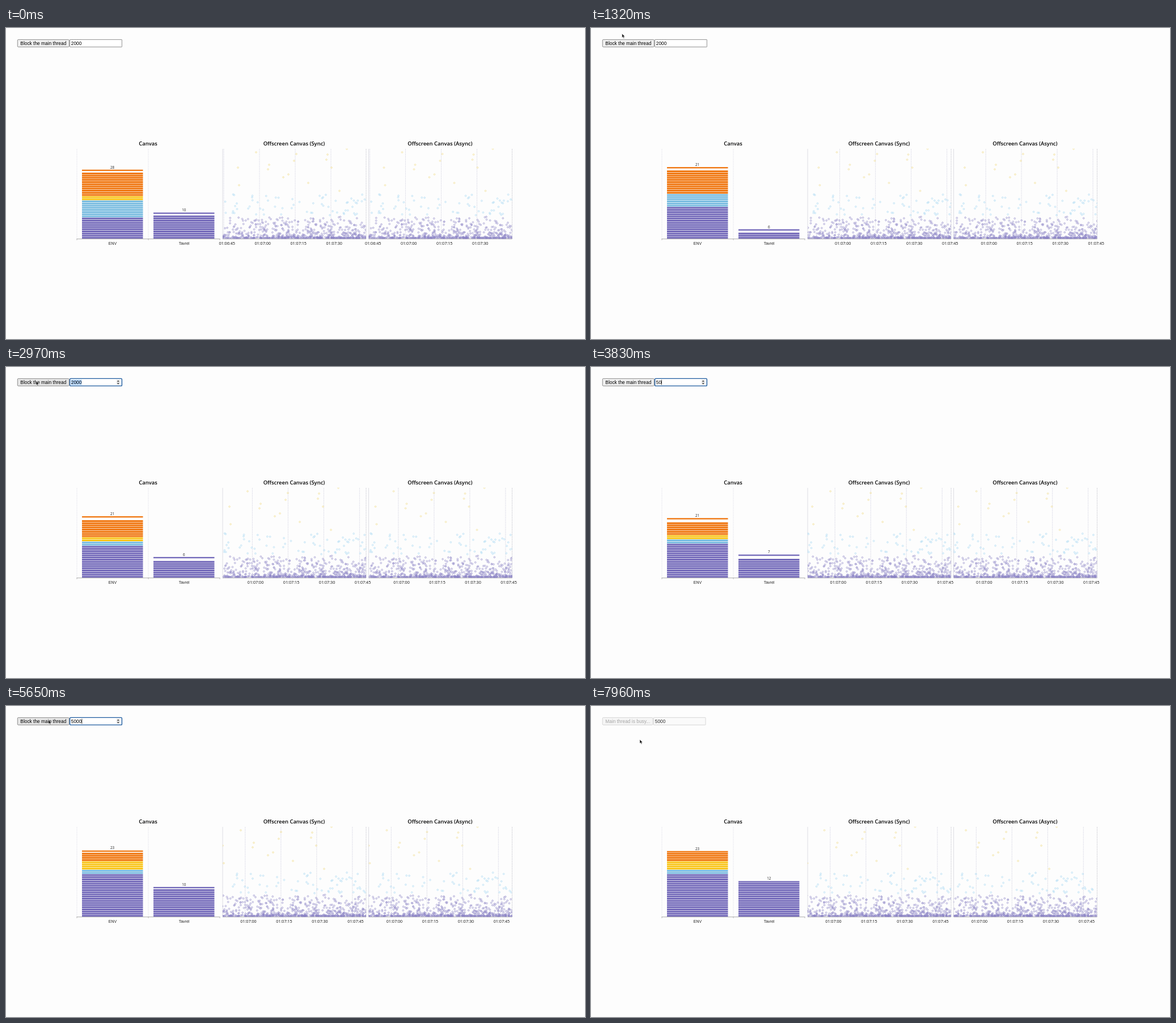
An HTML page with a canvas for the animation above (8000 ms loop, 1021x548 px).

```html
<!DOCTYPE html>
<html lang="en">
<head>
<meta charset="utf-8">
<title>Canvas chart comparison</title>
<style>
  html, body { margin: 0; width: 100%; height: 100%; overflow: hidden; background: #fdfdfd; }
  canvas, svg { position: absolute; left: 0; top: 0; width: 1021px; height: 548px; }
  text { white-space: pre; }
  .ui { font: 8.4px "Liberation Sans", Arial, sans-serif; }
  .title { font: 600 9.45px "Open Sans", "Noto Sans", sans-serif; text-anchor: middle; }
  .name { font: 7px "Liberation Sans", Arial, sans-serif; text-anchor: middle; fill: #222; }
  .count { font: 6.2px "Open Sans", "Noto Sans", sans-serif; text-anchor: middle; fill: #222; }
  .tick { font: 500 7.2px "Open Sans", "Noto Sans", sans-serif; fill: #111; }
</style>
</head>
<body>
<canvas id="stage"></canvas>
<svg viewBox="0 0 1021 548">
  <g class="ui">
    <rect id="button" x="20.3" y="20.4" height="13" rx="1.6" stroke-width=".8"/>
    <text id="caption" x="25.3" y="30"></text>
    <rect id="field" y="20.4" height="13" width="91.8"/>
    <rect id="marked" x="114.6" y="22.3" width="19" height="9.4" fill="#b3d7fe"/>
    <text id="value" y="30"></text>
    <rect id="caret" y="22.6" width=".8" height="8.8"/>
    <g id="spinner">
      <rect x="194.3" y="22" width="7.2" height="9.8" fill="#efefef"/>
      <path d="M195.7 26l2.1-2.8 2.1 2.8zM195.7 28l2.1 2.8 2.1-2.8z" fill="#505050"/>
    </g>
  </g>
  <g class="title">
    <text x="250.6" y="207.2">Canvas</text>
    <text x="508" y="207.2">Offscreen Canvas (Sync)</text>
    <text x="765.4" y="207.2">Offscreen Canvas (Async)</text>
  </g>
  <text class="name" x="188" y="382">ENV</text>
  <text class="name" x="314" y="382">Tavrel</text>
  <text class="count" id="countA" x="187.6"></text>
  <text class="count" id="countB" x="313.7"></text>
  <g class="tick" id="ticks"></g>
  <path id="pointer" d="M0 0v7l1.6-1.4 1.2 2.7 1.2-.5-1.2-2.6h2.2z" fill="#111" stroke="#fff" stroke-width=".5"/>
</svg>
<script>
const LOOP = 8000, BLOCKED = 6200;
const TOP = 213, BASE = 371.3, LEFT = 382, WIDTH = 253, ASYNC = 257.5;
const PITCH = 3.78, STEP = 63;
const PURPLE = '#7268b9', BLUE = '#79bce0', YELLOW = '#f9c51a', ORANGE = '#f0760f';

const $ = id => document.getElementById(id);
const set = (el, attrs) => { for (const k in attrs) el.setAttribute(k, attrs[k]); };
const show = (el, on) => el.setAttribute('visibility', on ? 'visible' : 'hidden');
const clamp = (v, min = 0, max = 1) => Math.max(min, Math.min(max, v));
const mix = (a, b, k) => a + (b - a) * k;

const canvas = $('stage'), ctx = canvas.getContext('2d');
const ratio = window.devicePixelRatio || 1;
canvas.width = 1021 * ratio;
canvas.height = 548 * ratio;
ctx.scale(ratio, ratio);

function line(x1, y1, x2, y2, color, dash = []) {
  ctx.strokeStyle = color;
  ctx.lineWidth = .8;
  ctx.setLineDash(dash);
  ctx.beginPath();
  ctx.moveTo(x1, y1);
  ctx.lineTo(x2, y2);
  ctx.stroke();
  ctx.setLineDash([]);
}

// Chart data: stripes per colour in each bar, and the totals above them
const states = [
  { at: -999, a: [10, 8, 2, 11], b: [11], totals: [28, 10] },
  { at: 300, a: [15, 6, 0, 11], b: [3], totals: [20, 2] },
  { at: 1300, a: [15, 2, 2, 8], b: [8], totals: [21, 6] },
  { at: 3300, a: [16, 2, 2, 6], b: [9], totals: [21, 7] },
  { at: 4300, a: [13, 8, 3, 8], b: [10], totals: [20, 6] },
  { at: 5300, a: [20, 2, 4, 4], b: [13], totals: [23, 10] },
  { at: 5700, a: [20, 2, 4, 4], b: [16], totals: [23, 12] }
];

// The cap drifts up from its stack, then drops and settles
const capGap = s => s < 4.3 ? 2.2 + .6 * s : 1.3 * clamp((6.2 - s) / .7);

function drawBar(x, counts, gap, label, total) {
  const colors = [PURPLE, BLUE, YELLOW, ORANGE];
  let n = 0;
  counts.forEach((count, c) => {
    ctx.fillStyle = colors[c];
    for (let i = 0; i < count; i++) ctx.fillRect(x, BASE - ++n * PITCH + .7, 107.5, PITCH - .7);
  });
  const cap = BASE - n * PITCH - gap - 2.3;
  ctx.fillRect(x, cap, 107.5, 2.3);
  label.textContent = total;
  label.setAttribute('y', cap - 2.1);
}

function drawBars(t) {
  const i = states.findLastIndex(s => s.at <= t);
  const now = states[i], old = states[Math.max(0, i - 1)];
  const k = clamp((t - now.at) / 300), gap = capGap(t / 1000);
  const stripes = bar => now[bar].map((v, n) => Math.round(mix(old[bar][n], v, k)));
  for (const x of [125, 251]) line(x, TOP, x, BASE, '#dfdfe9', [2, 1]);
  drawBar(134, stripes('a'), gap, $('countA'), now.totals[0]);
  drawBar(260, stripes('b'), gap, $('countB'), now.totals[1]);
  line(124.5, 371.7, 377.5, 371.7, '#999');
  for (const x of [125, 251, 377]) line(x, 371.7, x, 374, '#aaa');
}

// Scatter points: dense near the axis, ever sparser above
let seed = 71;
const random = () => (seed = (seed * 16807) % 2147483647) / 2147483647;
const cloud = (count, bottom, height, power) => Array.from({ length: count },
  () => [LEFT + random() * 290, bottom - height * random() ** power]);
const slow = [[441, 219], [409, 246], [464, 241], [462, 249], [512, 222], [508, 234], [567, 223],
  [565, 232], [574, 246], [601, 213], [489, 263], [498, 258], [411, 277], [533, 273], [588, 287]];
const layers = [
  [cloud(760, 370.3, 38, 3.3), '#8a82c5'],
  [cloud(76, 330, 37, 1.2), '#a3d6f1'],
  [slow, '#f0da86']
];

// Points glide; the grid and its labels move once a second
const pointShift = s => 4.5 * s + 1.6 * clamp(s / .67);
const gridShift = t => 4.2 * clamp(Math.floor((t + 700) / 1000), 0, 6);
const gridX = (i, t) => 384 + i * STEP - gridShift(t);
const inChart = x => x >= LEFT && x <= LEFT + WIDTH;

function drawScatter(offset, t, shift) {
  ctx.save();
  ctx.translate(offset, 0);
  line(LEFT, TOP, LEFT, BASE, '#d6d6de');
  line(LEFT + WIDTH, TOP, LEFT + WIDTH, BASE, '#c4c4cc', [2, 1]);
  for (let i = 0; i < 5; i++) {
    const x = gridX(i, t);
    if (inChart(x)) line(x, TOP, x, BASE, '#d5d5e2', [2, 1]);
  }
  line(LEFT, 371.7, LEFT + WIDTH, 371.7, '#999');
  ctx.beginPath();
  ctx.rect(LEFT, TOP - .5, WIDTH, 159);
  ctx.clip();
  ctx.lineWidth = .65;
  for (const [points, color] of layers) {
    ctx.strokeStyle = color;
    ctx.beginPath();
    for (const [x, y] of points) {
      ctx.moveTo(x - shift + 1.35, y);
      ctx.arc(x - shift, y, 1.35, 0, 7);
    }
    ctx.stroke();
  }
  ctx.restore();
}

const ticks = [0, ASYNC].flatMap(offset =>
  ['01:06:45', '01:07:00', '01:07:15', '01:07:30', '01:07:45'].map((time, i) => {
    const el = document.createElementNS('http://www.w3.org/2000/svg', 'text');
    el.textContent = time;
    el.setAttribute('y', 381.7);
    $('ticks').append(el);
    return { el, i, offset };
  }));

function drawTicks(t) {
  for (const { el, i, offset } of ticks) {
    const x = gridX(i, t);
    el.setAttribute('x', x + offset - 8.6);
    show(el, inChart(x));
  }
}

// Pointer stops: time, x, y
const stops = [[1000, 0, 2], [1850, 145, 23], [2150, 145, 23], [2850, 42, 25], [3400, 92, 24],
  [4300, 92, 24], [4890, 80, 19], [5250, 75, 24.5], [6150, 75, 24.5], [6340, 86, 59]];

function pointerAt(t) {
  const next = stops.findIndex(s => s[0] > t);
  if (next < 1) return stops[next ? stops.length - 1 : 0].slice(1);
  const a = stops[next - 1], b = stops[next];
  const k = (t - a[0]) / (b[0] - a[0]);
  return [mix(a[1], b[1], k), mix(a[2], b[2], k)];
}

function drawControls(t) {
  const busy = t >= BLOCKED, focus = t >= 1900 && !busy;
  const [px, py] = pointerAt(t);
  const visible = t >= 1000 && (t < 3450 || t >= 4300);
  const over = visible && px > 20 && px < 111 && py > 20.5 && py < 33;
  const typed = t < 3500 ? '2000' : '5000'.slice(0, 1 + Math.floor((t - 3500) / 215));
  const textX = busy ? 112.8 : 114.8;

  set($('button'), {
    width: busy ? 88.8 : 91,
    fill: busy ? '#f5f5f5' : over ? '#e4e4e4' : '#efefef',
    stroke: busy ? '#cfcfcf' : '#767676'
  });
  $('caption').textContent = busy ? 'Main thread is busy...' : 'Block the main thread';
  $('caption').setAttribute('fill', busy ? '#a5a5a5' : '#000');
  set($('field'), {
    x: busy ? 110.3 : 112.6,
    rx: focus ? 1.5 : .5,
    fill: busy ? '#fafafa' : '#fff',
    stroke: busy ? '#cfcfcf' : focus ? '#1d5b9f' : '#767676',
    'stroke-width': focus ? 1.4 : .8
  });
  $('value').textContent = typed;
  set($('value'), { x: textX, fill: busy ? '#333' : '#000' });
  show($('marked'), t >= 2400 && t < 3500);
  $('caret').setAttribute('x', textX + typed.length * 4.67);
  show($('caret'), (t >= 3500 && t < 4650) || (t >= 5200 && t < 5760));
  show($('spinner'), t >= 1700 && !busy);
  $('pointer').setAttribute('transform', `translate(${px} ${py})`);
  show($('pointer'), visible);
}

function render(t) {
  ctx.fillStyle = '#fdfdfd';
  ctx.fillRect(0, 0, 1021, 548);
  drawBars(t);
  drawScatter(0, t, pointShift(Math.min(t, BLOCKED) / 1000));
  drawScatter(ASYNC, t, pointShift(t / 1000));
  drawTicks(t);
  drawControls(t);
}

const start = performance.now();
function frame() {
  render((performance.now() - start) % LOOP);
  requestAnimationFrame(frame);
}
frame();
</script>
</body>
</html>
```
